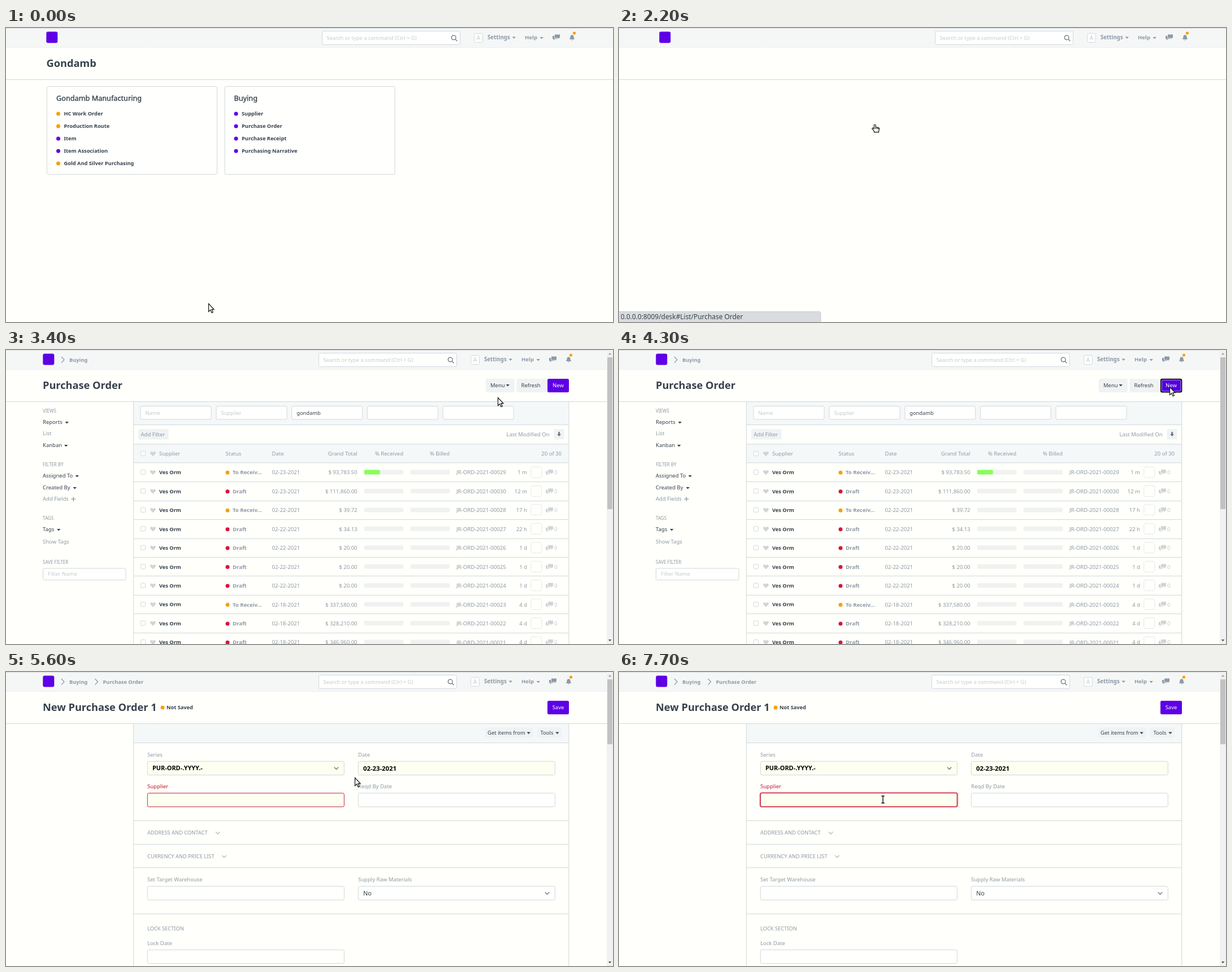
An HTML page for the animation above (8000 ms loop, 1074 by 521 pixels).

```html
<!DOCTYPE html>
<html lang="en">
<head>
<meta charset="utf-8">
<title>Creating a purchase order</title>
<style>
html, body { margin: 0; width: 100%; height: 100%; overflow: hidden; background: #fffffb; }
svg { display: block; width: 100%; height: 100%; }
text { font-family: "Noto Sans", "Open Sans", sans-serif; fill: #8d99a6; white-space: pre; }
.b { font-weight: 700; }
.m { stroke: #36414c; stroke-width: .35; }
.s { font-weight: 600; }
.e { text-anchor: end; }
.c { text-anchor: middle; }
.k { fill: #36414c; }
.K { fill: #000; }
.p { fill: #c4cad0; }
.r { fill: #c8102e; }
.w { fill: #fff; }
.line { stroke: #d1d8dd; fill: none; }
.box { stroke: #d1d8dd; fill: #fffffd; }
.tint { fill: #f5f8f8; }
.btn { fill: #f0f3f4; }
.need { fill: #fdfff0; }
.missing { fill: #fdfff0; stroke: #c8203c; }
.primary { fill: #5e00e6; }
.icon { fill: none; stroke: #8d99a6; stroke-width: 1.3; }

/* One loop is 8 s, so 1.25% is 100 ms. */
.a { animation: 8s step-end infinite; }
.home { animation-name: home; }
.homebar { animation-name: homebar; }
.deskbar { animation-name: deskbar; }
.list { animation-name: list; }
.form { animation-name: form; }
.draft { animation-name: draft; }
.ready { animation-name: ready; }
.over1 { animation-name: over1; }
.over2 { animation-name: over2; }
.over3 { animation-name: over3; }
.status { animation-name: status; }
.strip { animation-name: strip; }
.link { animation-name: link; }
.wait { animation-name: wait; }
.new { animation-name: new; }
.ring { animation-name: ring; }
.save { animation-name: save; }
.glow { animation-name: glow; }
.caret { animation-name: caret; }
.cursor { animation-name: cursor; }
.arrow { animation-name: arrow; }
.hand { animation-name: hand; }
.beam { animation-name: beam; }

@keyframes home { 0% { opacity: 1 } 27.5%, to { opacity: 0 } }
@keyframes homebar { 0% { opacity: 1 } 30%, to { opacity: 0 } }
@keyframes deskbar { 0% { opacity: 0 } 30%, to { opacity: 1 } }
@keyframes list { 0% { opacity: 0 } 30% { opacity: 1 } 58.75%, to { opacity: 0 } }
@keyframes form { 0% { opacity: 0 } 58.75%, to { opacity: 1 } }
@keyframes draft { 0% { opacity: 0 } 58.75% { opacity: 1 } 62.5%, to { opacity: 0 } }
@keyframes ready { 0% { opacity: 0 } 62.5%, to { opacity: 1 } }
@keyframes over1 {
  0%, 10%, to { fill: #36414c; text-decoration: none }
  8.75% { fill: #000; text-decoration: underline }
}
@keyframes over2 {
  0%, 11.25%, to { fill: #36414c; text-decoration: none }
  10% { fill: #000; text-decoration: underline }
}
@keyframes over3 {
  0%, 27.5%, to { fill: #36414c; text-decoration: none }
  11.25% { fill: #000; text-decoration: underline }
}
@keyframes status {
  0% { opacity: 0 } 13.75% { opacity: .6 } 15% { opacity: 1 } 30% { opacity: .6 } 31.25% { opacity: .25 }
  32.5% { opacity: 0 } 56.25% { opacity: 1 } 58.75% { opacity: .6 } 60% { opacity: .25 } 61.25%, to { opacity: 0 }
}
@keyframes strip { 0% { width: 229px } 21.25%, to { width: 360px } }
@keyframes link { 0% { opacity: 1 } 50%, to { opacity: 0 } }
@keyframes wait { 0% { opacity: 0 } 50%, to { opacity: 1 } }
@keyframes new { 0% { fill: #5e00e6 } 47.5%, to { fill: #5000dc } }
@keyframes ring { 0% { opacity: 0 } 50% { opacity: 1 } 58.75%, to { opacity: 0 } }
@keyframes save { 0% { fill: #5500dc } 70%, to { fill: #5e00e6 } }
@keyframes glow { 0% { opacity: 0 } 88.75% { opacity: .35 } 90% { opacity: .75 } 93.75%, to { opacity: 1 } }
@keyframes caret { 0% { opacity: 0 } 90% { opacity: 1 } 96.25%, to { opacity: 0 } }
@keyframes cursor {
  0% { transform: translate(358px, 488px) }
  2.5% { transform: translate(366px, 470px) }
  3.75% { transform: translate(385px, 425px) }
  5% { transform: translate(412px, 360px) }
  6.25% { transform: translate(438px, 290px) }
  7.5% { transform: translate(452px, 238px) }
  8.75% { transform: translate(456px, 214px) }
  10% { transform: translate(455px, 193px) }
  11.25% { transform: translate(453px, 176px) }
  12.5% { transform: translate(453px, 171px) }
  38.75% { transform: translate(500px, 163px) }
  40% { transform: translate(610px, 143px) }
  41.25% { transform: translate(760px, 112px) }
  42.5% { transform: translate(870px, 84px) }
  43.75% { transform: translate(893px, 92px) }
  46.25% { transform: translate(940px, 80px) }
  47.5% { transform: translate(974px, 65px) }
  70% { transform: translate(617px, 187px) }
  71.25% { transform: translate(570px, 200px) }
  72.5% { transform: translate(545px, 206px) }
  73.75% { transform: translate(538px, 207px) }
  78.75% { transform: translate(526px, 216px) }
  80% { transform: translate(505px, 230px) }
  81.25% { transform: translate(492px, 239px) }
  85% { transform: translate(478px, 231px) }
  86.25%, to { transform: translate(467px, 226px) }
}
@keyframes arrow {
  0% { opacity: 1 } 8.75% { opacity: 0 } 38.75% { opacity: 1 } 47.5% { opacity: 0 } 53.75% { opacity: 1 }
  58.75% { opacity: 0 } 67.5% { opacity: 1 } 78.75% { opacity: 0 } 81.25% { opacity: 1 } 85%, to { opacity: 0 }
}
@keyframes hand {
  0% { opacity: 0 } 8.75% { opacity: 1 } 38.75% { opacity: 0 } 47.5% { opacity: 1 } 53.75% { opacity: 0 }
  58.75% { opacity: 1 } 67.5%, to { opacity: 0 }
}
@keyframes beam { 0% { opacity: 0 } 78.75% { opacity: 1 } 81.25% { opacity: 0 } 85%, to { opacity: 1 } }
</style>
</head>
<body>
<svg id="stage" viewBox="0 0 1074 521" xmlns="http://www.w3.org/2000/svg"></svg>
<script>
const ORANGE = '#f5a20c', PURPLE = '#5e00e6', RED = '#d8143c';

// y is the vertical middle of the capitals
const text = (x, y, s, cls = '', size = /\bb\b/.test(cls) ? 9.25 : 9.5) =>
  `<text x="${x}" y="${(y + size * .36).toFixed(2)}" font-size="${size}" class="${cls}">${s}</text>`;
const rect = (x, y, w, h, cls = '', r = 0, more = '') =>
  `<rect x="${x}" y="${y}" width="${w}" height="${h}" rx="${r}" class="${cls}" ${more}/>`;
const path = (d, cls = '', more = '') => `<path d="${d}" class="${cls}" ${more}/>`;
const dot = (x, y, color, r = 3.5) => `<circle cx="${x}" cy="${y}" r="${r}" fill="${color}"/>`;
const hline = (y, x1 = 225.5, x2 = 996) => path(`M${x1} ${y}H${x2}`, 'line');
const group = (cls, ...parts) => `<g class="a ${cls}">${parts.join('')}</g>`;
const caret = (x, y, color = '#36414c') => path(`M${x} ${y - 1.5}h6.4l-3.2 3.6z`, '', `fill="${color}"`);
const chevron = (x, y, up = 1, color = '#8d99a6') =>
  path(`M${x - 3.7} ${y - 1.8 * up}l3.7 ${3.8 * up} 3.7 ${-3.8 * up}`, 'icon', `style="stroke:${color}"`);
const crumb = x => path(`M${x} 12l5 5.3-5 5.3`, 'icon');
const bubbles = (x, y, color) =>
  path(`M${x + 4} ${y - 5}h9v6h-2v2l-2-2h-5zM${x} ${y - 2.5}h3.2v4.3h5v1h-4l-2.4 2.4v-2.4H${x}z`, '', `fill="${color}"`);

const topBar = (dx, width) => `
  ${rect(0, 0, width, 34.5, '', 0, 'fill="#f5f7f7"')}
  ${path(`M0 .5H${width}`, '', 'stroke="#d9dcde"')}
  ${path(`M0 34.5H${width}`, '', 'stroke="#edf0f0"')}
  ${hline(91.5, 0, width)}
  <g transform="translate(${dx})">
    ${rect(65.3, 6.5, 20, 20, 'primary', 3)}
    ${rect(553.5, 5.5, 244, 24, 'box', 2)}
    ${text(561.5, 17.5, 'Search or type a command (Ctrl + G)', 'p', 9.4)}
    ${path('M790 17a3.9 3.9 0 1 1-7.8 0 3.9 3.9 0 1 1 7.8 0M789 20l3.4 3.3', 'icon', 'style="stroke:#6c7680"')}
    ${rect(822.5, 9.5, 15, 16, 'box', 3)}${text(830, 17.5, 'A', 'c p', 10)}
    ${text(846, 17, 'Settings', 'b', 9.7)}${caret(889.5, 17, '#8d99a6')}
    ${text(912, 17, 'Help', 'b', 9.6)}${caret(938.5, 17.5, '#8d99a6')}
    ${bubbles(961, 16.5, '#8d99a6')}
    ${path('M990.7 20q1.8-1.5 1.8-4.5 0-3 3-3.2 3 .2 3 3.2 0 3 1.8 4.5zM994 20.8h3l-1.5 1.4z', '', 'fill="#8d99a6"')}
    ${dot(999.5, 9, ORANGE, 2.6)}
  </g>`;

const scrollbar = bottom => rect(1063, 0, 11, 521, '', 0, 'fill="#f1f1f1"') +
  rect(1064, 13, 9, bottom - 13, '', 0, 'fill="#c1c1c1"') +
  path('M1065.7 8.2h5.6l-2.8-3.2z', '', 'fill="#a3a3a3"') +
  path('M1065.7 513h5.6l-2.8 3.2z', '', 'fill="#505050"');

const card = (x, title, links) => rect(x, 103.5, 301, 156, 'box', 3) +
  text(x + 16.5, 124.5, title, 'k m', 12.7) +
  links.map(([name, color, hover = ''], i) => {
    const y = 151.8 + i * 22;
    return dot(x + 20, y + .2, color) + text(x + 30, y, name, `k b a ${hover}`);
  }).join('');

const home = group('home',
  text(71.5, 62.5, 'Gondamb', 'k s', 18.2),
  card(72.5, 'Gondamb Manufacturing', [
    ['HC Work Order', ORANGE], ['Production Route', ORANGE], ['Item', PURPLE],
    ['Item Association', PURPLE], ['Gold And Silver Purchasing', ORANGE]]),
  card(387, 'Buying', [
    ['Supplier', PURPLE], ['Purchase Order', PURPLE, 'over3'],
    ['Purchase Receipt', PURPLE, 'over2'], ['Purchasing Narrative', PURPLE, 'over1']]));

const heart = y => path(`M260 ${y + 4.3}l-4.4-4.4q-1.4-3.1 1.4-3.9 2-.2 3 1.5 1-1.7 3-1.5 2.8.8 1.4 3.9z`, '', 'fill="#d0d4d8"');
const check = y => rect(238.5, y - 4.5, 8, 8, 'box', 1);

const orders = [
  [1, '02-23', '93,783.50', 29, '1 m'], [0, '02-23', '111,860.00', 30, '12 m'],
  [1, '02-22', '39.72', 28, '17 h'], [0, '02-22', '34.13', 27, '22 h'],
  [0, '02-22', '20.00', 26, '1 d'], [0, '02-22', '20.00', 25, '1 d'],
  [0, '02-22', '20.00', 24, '1 d'], [1, '02-18', '337,580.00', 23, '4 d'],
  [0, '02-18', '328,210.00', 22, '4 d'], [0, '02-18', '346,960.00', 21, '4 d']];

const orderRow = ([open, day, total, id, age], i) => {
  const y = 217 + i * 33.45, track = x => rect(x, y - 4.5, 69.5, 8, '', 2, 'fill="#f0f1f1"');
  return check(y) + heart(y) + text(271, y, 'Ves Orm', 'b k') +
    dot(392, y + .3, open ? ORANGE : RED) + text(401, y, open ? 'To Receiv…' : 'Draft', 'b', 9.5) +
    text(470.5, y, day + '-2021') + text(621.5, y, '$ ' + total, 'e') + track(633.7) + track(715.5) +
    (i ? '' : rect(633.7, y - 4.5, 28, 8, '', 2, 'fill="#86ff58"')) +
    text(797, y, 'JR-ORD-2021-000' + id, '', 9.6) + text(922, y, age, 'e') +
    rect(928.8, y - 10, 19, 19, 'line', 3, 'stroke-dasharray="2 1.5"') +
    bubbles(955, y, '#d0d4d8') + text(970, y, '0', 'p') + hline(Math.round(y + 16.2) + .5);
};

const button = (x, w, cls = 'btn') => rect(x, 51, w, 24, cls, 2.5);
const filterBox = (x, s = '', cls = '') => rect(x, 99.5, 125, 23.5, 'box', 2) + text(x + 8.5, 111.5, s, cls, 9.3);
const sides = path('M225.5 92V521M995.8 92V521', 'line');

const list = group('list', scrollbar(282), crumb(98), text(112, 17.5, 'Buying', 'b'),
  text(65, 62.5, 'Purchase Order', 'k s', 18.2),
  button(848.7, 51), text(857, 62.5, 'Menu', 'k'), caret(884.5, 62.5),
  button(903.5, 52), text(911.5, 62.5, 'Refresh', 'k'),
  button(958, 38, 'a new'), text(977, 62.5, 'New', 'c w'),
  `<g class="a ring">${rect(958.8, 51.8, 36.6, 22.6, '', 2.5, 'fill="none" stroke="#111" stroke-width="2"')}
   ${rect(960.3, 53.3, 33.6, 19.6, '', 1.5, 'fill="none" stroke="#c9b4f4" stroke-width=".8"')}</g>`,
  text(65, 108.3, 'VIEWS', '', 8), text(65, 128, 'Reports', 'k'), caret(104.5, 128.5),
  text(65, 147.5, 'List'), text(65, 169, 'Kanban', 'k'), caret(103, 169.5),
  text(65, 203, 'FILTER BY', '', 8), text(65, 223, 'Assigned To', 'k'), caret(122.5, 223.5),
  text(65, 244, 'Created By', 'k'), caret(118.5, 244.5), text(65, 263.8, 'Add Fields'),
  path('M115.3 264.2h8M119.3 260.2v8', 'icon'),
  text(65, 298, 'TAGS', '', 8), text(65, 318, 'Tags', 'k'), caret(90, 318.5), text(65, 339.5, 'Show Tags'),
  text(65, 376, 'SAVE FILTER', '', 8), rect(65.5, 387, 146.5, 20.5, 'box', 2), text(74, 397, 'Filter Name', 'p'),
  rect(226, 92, 770, 40, 'tint'), hline(132.5),
  filterBox(238, 'Name', 'p'), filterBox(372, 'Supplier', 'p'), filterBox(505.7, 'gondamb', 'k'),
  filterBox(639.3), filterBox(773),
  rect(234, 140, 53.5, 18.5, 'btn', 2), text(238.5, 149.5, 'Add Filter'),
  text(885.5, 149.5, 'Last Modified On'), rect(969.5, 140, 18, 18.5, 'btn', 2),
  path('M977.3 145h2.6v4h2.2l-3.5 4-3.5-4h2.2z', '', 'fill="#6c7680"'),
  rect(226, 167, 770, 33, 'tint'), hline(167), hline(199.8),
  check(184), heart(184), text(271, 184, 'Supplier'), text(388.5, 184, 'Status'), text(470.5, 184, 'Date'),
  text(621.5, 184, 'Grand Total', 'e'), text(703, 184, '% Received', 'e'), text(785, 184, '% Billed', 'e'),
  text(983, 184, '20 of 30', 'e'), orders.map(orderRow).join(''), sides);

// A column is 0 (left) or 1 (right); y is the middle of the label.
const field = (col, y, label, value = '', kind = 'box', arrow) => {
  const x = col ? 623 : 250, bold = kind !== 'box', red = kind === 'missing';
  return text(x, y, label, red ? 'r' : '') +
    rect(x + .3, y + 11.8, 348, 24.2, `line ${kind}`, 2.5) +
    text(x + 9, y + 24, value, bold ? 'b K' : 'k', value[0] === '0' ? 11.3 : 10.9) +
    (arrow ? chevron(x + 334.5, y + 24, 1, '#6c7680') : '');
};
const section = (y, s, x, up) => text(250, y, s, '', 9.3) + (x ? chevron(x, y, up, '#b4bcc4') : '');
const basics = y => field(0, y, 'Series', 'PUR-ORD-.YYYY.-', 'need', true) + field(1, y, 'Date', '02-23-2021', 'need') +
  field(0, y + 56.4, 'Supplier', '', 'missing') + field(1, y + 56.4, 'Reqd By Date');

const form = group('form', crumb(98), text(112, 17.5, 'Buying', 'b'), crumb(157.5), text(171.5, 17.5, 'Purchase Order', 'b'),
  text(65, 62.5, 'New Purchase Order 1', 'k s', 18.2), dot(277, 63, ORANGE), text(284, 62.5, 'Not Saved', 'b k'),
  button(958, 38, 'a save'), text(977, 62.5, 'Save', 'c w'), sides);

const draft = group('draft', scrollbar(133), basics(111.5),
  field(0, 224.5, 'Company', 'gondamb', 'need'), hline(284.7),
  section(311.3, 'DROP SHIP'), field(1, 337, 'Customer Contact'), hline(397.5),
  section(419, 'ADDRESS AND CONTACT', 374.7, 1), hline(438.8),
  section(461, 'CURRENCY AND PRICE LIST', 386, -1),
  field(0, 489, 'Currency', 'USD', 'need'), field(1, 489, 'Price List', 'Standard Buying'));

const ready = group('ready', scrollbar(128), rect(226, 92, 769.5, 33, 'tint'), hline(125.5),
  rect(848, 98.5, 84, 18.5, 'btn', 2), text(852, 107.5, 'Get items from', 'k'), caret(921.5, 108),
  rect(940, 98.5, 43, 18.5, 'btn', 2), text(945.5, 107.5, 'Tools', 'k'), caret(972.2, 108),
  basics(146.5), hline(263.5), section(285, 'ADDRESS AND CONTACT', 374.7, 1), hline(305.3),
  section(326.8, 'CURRENCY AND PRICE LIST', 386, 1), hline(346.8),
  field(0, 368, 'Set Target Warehouse'), field(1, 368, 'Supply Raw Materials', 'No', 'box', true),
  hline(428.7), section(455, 'LOCK SECTION'), field(0, 480.5, 'Lock Date'),
  `<g class="a glow">${rect(249.3, 213.5, 350, 26, '', 4, 'fill="none" stroke="#f3b9bd" stroke-width="2.5"')}
   ${rect(250.3, 214.5, 348, 24, 'need', 2.5, 'stroke="#b8001c" stroke-width="1.2"')}</g>`,
  rect(259, 220, 1, 13, 'a caret'));

const status = group('status',
  `<rect class="a strip" x="-3" y="502.5" width="229" height="24" rx="3" fill="#d9dcde" stroke="#cbcfd2"/>`,
  text(3, 512, '0.0.0.0:8009/desk#List/Purchase Order', 'a link k', 11.9),
  text(3, 512, 'Waiting for 0.0.0.0…', 'a wait k', 12));

const cursor = group('cursor',
  path('M.5.5V14.6L3.7 11.6 6 16.7 8.3 15.6 6 10.6H10z', 'a arrow', 'fill="#fff" stroke="#111" stroke-width="1.2"'),
  path('M-1.7 1.3Q-1.7 0-.3 0T1.1 1.3V4.6L6 5.5Q7.8 6 7.7 7.7L6.6 11V13.6H-1.6V11.7L-5 7.6Q-5.5 5.8-3.8 6L-1.7 7.6zM1.2 5V8M3.7 5.6V8M5.8 6V8.3',
    'a hand', 'fill="#fff" stroke="#111" stroke-width="1.2"'),
  `<g class="a beam" fill="none">${['#fff" stroke-width="3', '#111" stroke-width="1.4'].map(stroke =>
    `<path d="M-2.7-6.3H-.7L0-5.6.7-6.3H2.7M-2.7 6.3H-.7L0 5.6.7 6.3H2.7M0-5.6V5.6" stroke="${stroke}"/>`).join('')}</g>`);

document.getElementById('stage').innerHTML =
  rect(0, 0, 1074, 521, '', 0, 'fill="#fffffb"') +
  group('homebar', topBar(6, 1074)) + home +
  group('deskbar', topBar(0, 1063)) + list + draft + ready + form + status + cursor;
</script>
</body>
</html>
```
